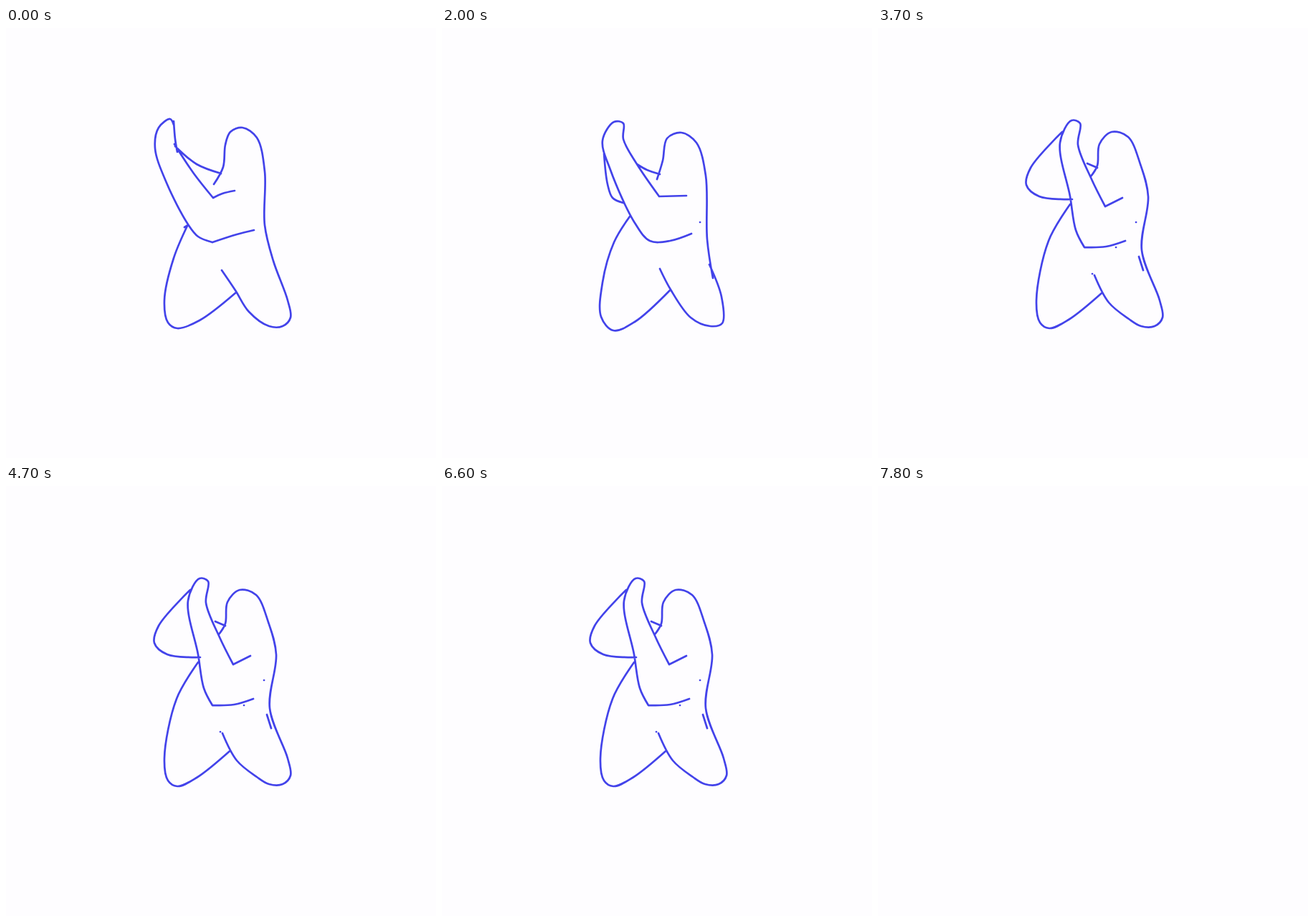
Recreate the animation shown at these times as an HTML page. Size 600x600 px, loop 8200 ms.

```html
<!DOCTYPE html>
<html lang="en">
<head>
<meta charset="utf-8">
<title>Sketch loop</title>
<style>
  html, body { margin: 0; width: 100%; height: 100%; overflow: hidden; background: #fefdff; }
  svg { display: block; width: 100%; height: 100%; }
  path { fill: none; stroke: #4343ea; stroke-width: 2.7; stroke-linecap: round; stroke-linejoin: round; }
</style>
</head>
<body>
<svg viewBox="0 0 600 600"><path id="lines"/></svg>
<script>
const LOOP = 8200, STEP = 100, BLANK_AT = 7800;
const RATE = 1.125, OFFSET = 0.3; // drawings advanced per step

// Parts that stay put between drawings
const knee = "221,380 226,411 239,419";
const foot = "393,380 397,404 386,416 367,416";
const speck = "360,271";

// Key points of each pen stroke
const reach = {
  arm: "234,135 229,127 213,139 208,168 224,216 254,274 268,291 288,299",
  forearm: "288,299 322,288 346,282",
  palm: "234,130 236,155 239,173",
  inner: "235,162 262,203 289,237",
  crook: "289,237 302,231 319,227",
  farArm: "236,165 266,190 300,203",
  back: `290,218 303,194 306,163 313,145 330,139 350,153 361,200 361,275 373,325 ${foot} 339,396 320,366 301,338`,
  leg: `254,274 234,321 ${knee} 270,408 321,369`,
  tick: "249,278 254,275"
};
const lift = {
  arm: "303,235 272,190 253,155 253,133 240,131 224,157 235,198 269,272 290,297 318,297 348,287",
  crook: "303,235 341,234",
  farArm: "226,175 231,218 238,237 253,244",
  shoulder: "272,190 286,198 304,204",
  back: "300,211 308,185 314,154 334,146 355,160 368,206 370,295 378,349",
  thigh: "373,330 390,375 391,412 374,416 347,404 319,365 304,336",
  leg: "262,263 240,299 224,355 222,403 239,422 269,410 318,366",
  speck
};
const pull = {
  arm: "317,249 298,211 279,163 282,133 270,129 254,160 268,235 276,282 288,306",
  forearm: "288,306 318,305 345,297",
  crook: "317,249 341,237",
  farArm: "257,145 213,195 207,219 225,235 271,239",
  shoulder: "292,189 306,195",
  back: `297,207 306,192 309,162 326,145 349,152 366,190 377,235 368,310 ${foot} 350,406 322,383 302,345`,
  hip: "364,319 370,338",
  leg: `268,246 238,297 ${knee} 266,407 312,370`,
  speck, drop: "332,306", fleck: "299,343"
};

// Bezier handle at b, for a centripetal spline through a, b, c
function handle(a, b, c) {
  const gap = (p, q) => Math.sqrt(Math.hypot(p[0] - q[0], p[1] - q[1]));
  const u = gap(a, b), v = gap(b, c);
  if (!u) return b;
  return b.map((x, k) =>
    x + v / (3 * (u + v)) * ((x - a[k]) * v / u + (c[k] - x) * u / v));
}

function spline(text) {
  const p = text.split(" ").map(s => s.split(",").map(Number));
  if (p.length === 1) return `M${p[0]}h.1`;
  let d = `M${p[0]}`;
  for (let i = 1; i < p.length; i++) {
    const from = p[i - 1], to = p[i];
    d += `C${handle(p[i - 2] || from, from, to)} ${handle(p[i + 1] || to, to, from)} ${to}`;
  }
  return d;
}

const drawings = [reach, lift, pull].map(pose => Object.values(pose).map(spline).join(""));
const lines = document.getElementById("lines");

function draw(ms) {
  const t = ms % LOOP;
  const step = Math.floor(t / STEP);
  const pose = Math.floor(step * RATE + OFFSET) % drawings.length;
  lines.setAttribute("d", t < BLANK_AT ? drawings[pose] : "");
}

const start = performance.now();
function tick() {
  draw(performance.now() - start);
  requestAnimationFrame(tick);
}
tick();
</script>
</body>
</html>
```
